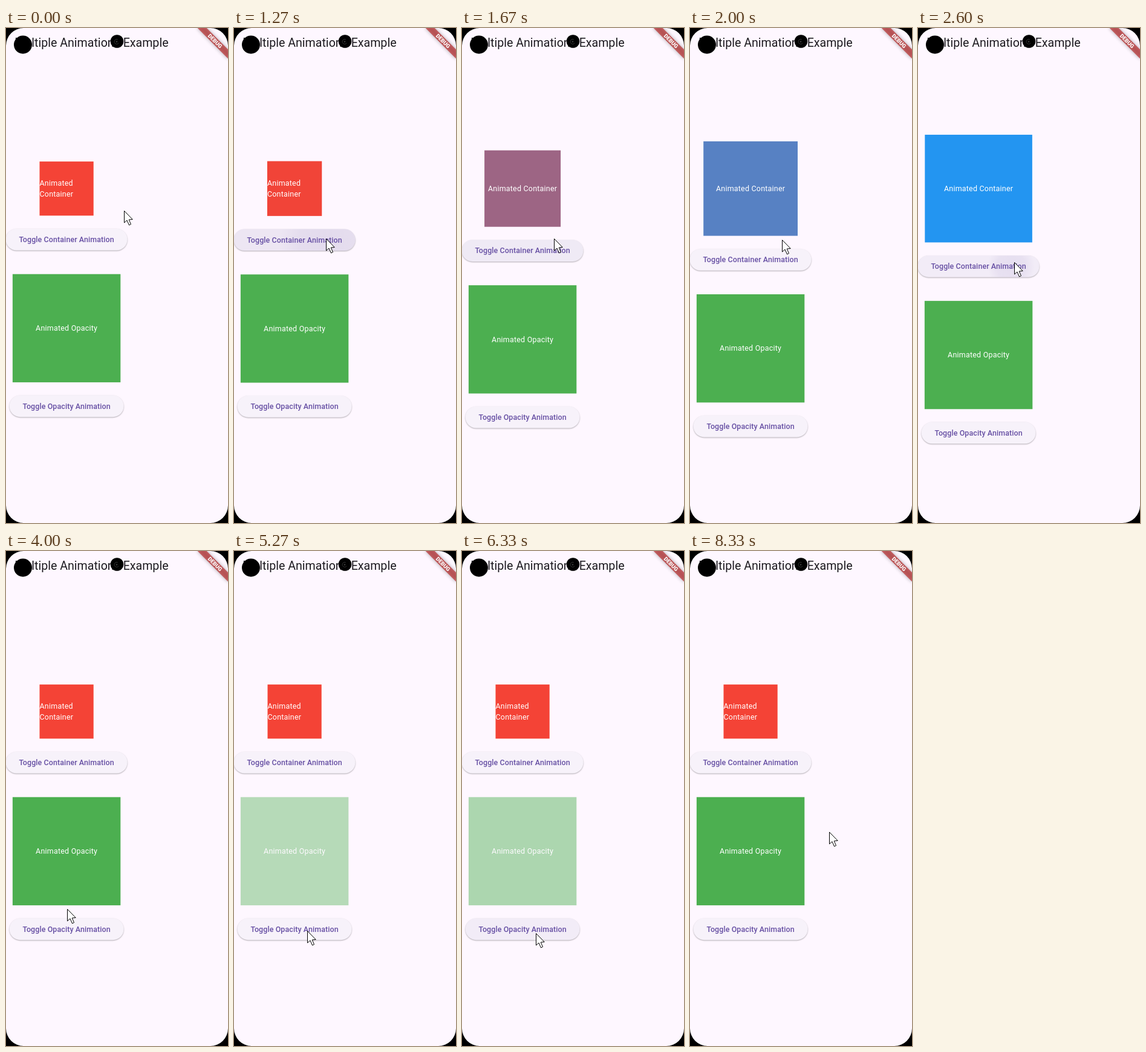
An HTML page with a canvas for the animation above (8.54 s loop, 367 by 816 pixels).

```html
<!DOCTYPE html>
<html lang="en">
<head>
<meta charset="utf-8">
<title>Multiple Animations Example</title>
<style>
  html, body { margin: 0; width: 100%; height: 100%; overflow: hidden; background: #000; }
  canvas { display: block; width: 367px; height: 816px; }
</style>
</head>
<body>
<canvas id="stage" width="367" height="816"></canvas>
<script>
const W = 367, H = 816, LOOP = 8540, STEP = 1000 / 15;
const DP = 0.892; // pixels per layout unit
const CX = 100.1, BOX_Y = 264.7;
const BG = [254, 247, 255], WHITE = [255, 255, 255];
const RED = [244, 67, 54], BLUE = [33, 150, 243], GREEN = [76, 175, 80];
const SURFACE = [247, 242, 250], PRIMARY = [103, 80, 164];

const ctx = document.getElementById('stage').getContext('2d');

// time, x, y of the pointer tip
const POINTER = [
  [0, 195, 301], [480, 164, 359], [870, 152, 347], [1930, 152, 347],
  [2400, 159, 386], [2670, 159, 386], [3130, 155, 362], [3470, 152, 352],
  [4000, 101, 590], [4270, 118, 612], [4470, 119, 621], [4800, 119, 621],
  [5670, 122, 630], [7270, 122, 630], [7800, 232, 455], [7930, 230, 459],
  [8067, 230, 459], [8133, 230, 462], [8267, 230, 462], [8333, 230, 463]
];

// press and toggle times, with the x of the touch
const SIZE_TAPS = [{ down: 1115, toggle: 1254, x: 152 }, { down: 2540, toggle: 2590, x: 154 }];
const FADE_TAPS = [{ down: 4640, toggle: 4672, x: 119 }, { down: 5840, toggle: 5875, x: 122 }];

const clamp = v => Math.min(1, Math.max(0, v));
const lerp = (a, b, k) => a + (b - a) * k;
const mix = (a, b, k) => a.map((v, i) => lerp(v, b[i], k));
const rgb = (c, a = 1) => `rgba(${c.map(Math.round).join(',')},${a})`;

// 0 to 1 after the first toggle, back to 0 after the second
const toggled = (taps, t) =>
  clamp((t - taps[0].toggle) / 1000) - clamp((t - taps[1].toggle) / 1000);

function pointerAt(t) {
  const i = POINTER.findIndex(p => p[0] > t);
  if (i < 0) return POINTER[POINTER.length - 1].slice(1);
  const [t0, x0, y0] = POINTER[i - 1], [t1, x1, y1] = POINTER[i];
  const u = (t - t0) / (t1 - t0), k = u * u * (3 - 2 * u);
  return [lerp(x0, x1, k), lerp(y0, y1, k)];
}

function setFont(size, weight, spacing) {
  ctx.font = `${weight} ${size * DP}px Roboto, sans-serif`;
  ctx.letterSpacing = spacing * DP + 'px';
}

// Text whose line box is centred on cy; without x it is centred on the column
function label(str, cy, size, x) {
  const left = x === undefined ? CX - ctx.measureText(str).width / 2 : x;
  ctx.fillText(str, left, cy + 0.342 * size * DP);
}

function disc(x, y, r, color) {
  ctx.fillStyle = color;
  ctx.beginPath();
  ctx.arc(x, y, r, 0, Math.PI * 2);
  ctx.fill();
}

function square(size, cy, color) {
  ctx.fillStyle = rgb(color);
  ctx.fillRect(CX - size / 2, cy - size / 2, size, size);
}

function button(str, cy, width, taps, t) {
  const h = 40 * DP;
  ctx.save();
  ctx.beginPath();
  ctx.roundRect(CX - width / 2, cy - h / 2, width, h, h / 2);
  ctx.shadowColor = 'rgba(0,0,0,0.3)';
  ctx.shadowBlur = 2;
  ctx.shadowOffsetY = 1;
  ctx.fillStyle = rgb(SURFACE);
  ctx.fill();
  ctx.shadowColor = 'transparent';
  ctx.clip();
  for (const tap of taps) ripple(tap, cy, t);
  ctx.restore();
  setFont(14, 500, 0.1);
  ctx.fillStyle = rgb(PRIMARY);
  label(str, cy, 14);
}

function ripple({ down, toggle, x }, cy, t) {
  const age = t - down, since = t - toggle;
  if (age <= 0 || since >= 540) return;
  const tint = 0.075 * clamp(age / 150) * clamp((540 - since) / 190);
  ctx.fillStyle = rgb(PRIMARY, tint);
  ctx.fillRect(0, cy - 20, W, 40);
  const r = 15 + age * 0.4, glow = 0.09 * clamp((400 - age) / 300);
  const g = ctx.createRadialGradient(x, cy, 0, x, cy, r);
  g.addColorStop(0, rgb(PRIMARY, glow));
  g.addColorStop(0.6, rgb(PRIMARY, glow * 0.8));
  g.addColorStop(1, rgb(PRIMARY, 0));
  ctx.fillStyle = g;
  ctx.fillRect(0, cy - 20, W, 40);
}

function column(t) {
  const k = toggled(SIZE_TAPS, t);
  const size = (100 + 100 * k) * DP, shift = 50 * k * DP;

  square(size, BOX_Y, mix(RED, BLUE, k));
  setFont(14, 400, 0.25);
  ctx.fillStyle = '#fff';
  if (ctx.measureText('Animated Container').width <= size) {
    label('Animated Container', BOX_Y, 14);
  } else {
    const left = CX - size / 2;
    label('Animated', BOX_Y - 10 * DP, 14, left);
    label('Container', BOX_Y + 10 * DP, 14, left);
  }
  button('Toggle Container Animation', 348.7 + shift, 201, SIZE_TAPS, t);

  const opacity = 1 - toggled(FADE_TAPS, t), cy = 494.9 + shift;
  square(200 * DP, cy, mix(BG, GREEN, opacity));
  setFont(14, 400, 0.25);
  ctx.fillStyle = rgb(mix(BG, WHITE, opacity));
  label('Animated Opacity', cy, 14);
  button('Toggle Opacity Animation', 623.3 + shift, 189, FADE_TAPS, t);
}

function banner() {
  ctx.save();
  ctx.translate(W, 0);
  ctx.rotate(Math.PI / 4);
  ctx.scale(DP, DP);
  ctx.shadowColor = 'rgba(0,0,0,0.5)';
  ctx.shadowBlur = 6;
  ctx.fillStyle = 'rgba(183,28,28,0.63)';
  ctx.fillRect(-40, 28, 80, 12);
  ctx.shadowColor = 'transparent';
  ctx.fillStyle = '#fff';
  ctx.font = '900 10.2px Roboto, sans-serif';
  ctx.letterSpacing = '0px';
  ctx.fillText('DEBUG', -ctx.measureText('DEBUG').width / 2, 37.5);
  ctx.restore();
}

function cameras() {
  disc(28, 27.5, 15, '#000');
  disc(183.5, 22, 10.8, '#000');
  ctx.strokeStyle = '#333';
  ctx.lineWidth = 1;
  ctx.beginPath();
  ctx.arc(183, 22.5, 4, 0.6, 5.2);
  ctx.stroke();
  disc(183, 22.5, 1.3, '#3a3a3a');
}

function corners() {
  ctx.fillStyle = '#000';
  ctx.beginPath();
  ctx.rect(0, 0, W, H);
  ctx.roundRect(0, 0, W, H, 29);
  ctx.fill('evenodd');
}

function pointer(t) {
  const [x, y] = pointerAt(t).map(Math.round);
  ctx.save();
  ctx.translate(x + 0.5, y + 0.5);
  ctx.beginPath();
  for (const [px, py] of [[0, 0], [0, 19.5], [4.5, 15.5], [8, 23.5], [11, 22], [7.7, 14.5], [13.7, 14]]) {
    ctx.lineTo(px, py);
  }
  ctx.closePath();
  ctx.fillStyle = '#fff';
  ctx.fill();
  ctx.strokeStyle = '#000';
  ctx.lineWidth = 1;
  ctx.stroke();
  ctx.restore();
}

function draw(t) {
  ctx.fillStyle = rgb(BG);
  ctx.fillRect(0, 0, W, H);
  setFont(22, 400, 0);
  ctx.fillStyle = '#1d1b20';
  label('Multiple Animations Example', 24.3, 22, 16 * DP);
  column(t);
  banner();
  cameras();
  corners();
  pointer(t);
}

const start = performance.now();
function tick() {
  const t = (performance.now() - start) % LOOP;
  draw(Math.floor((t + 5) / STEP) * STEP);
  requestAnimationFrame(tick);
}
tick();
</script>
</body>
</html>
```
